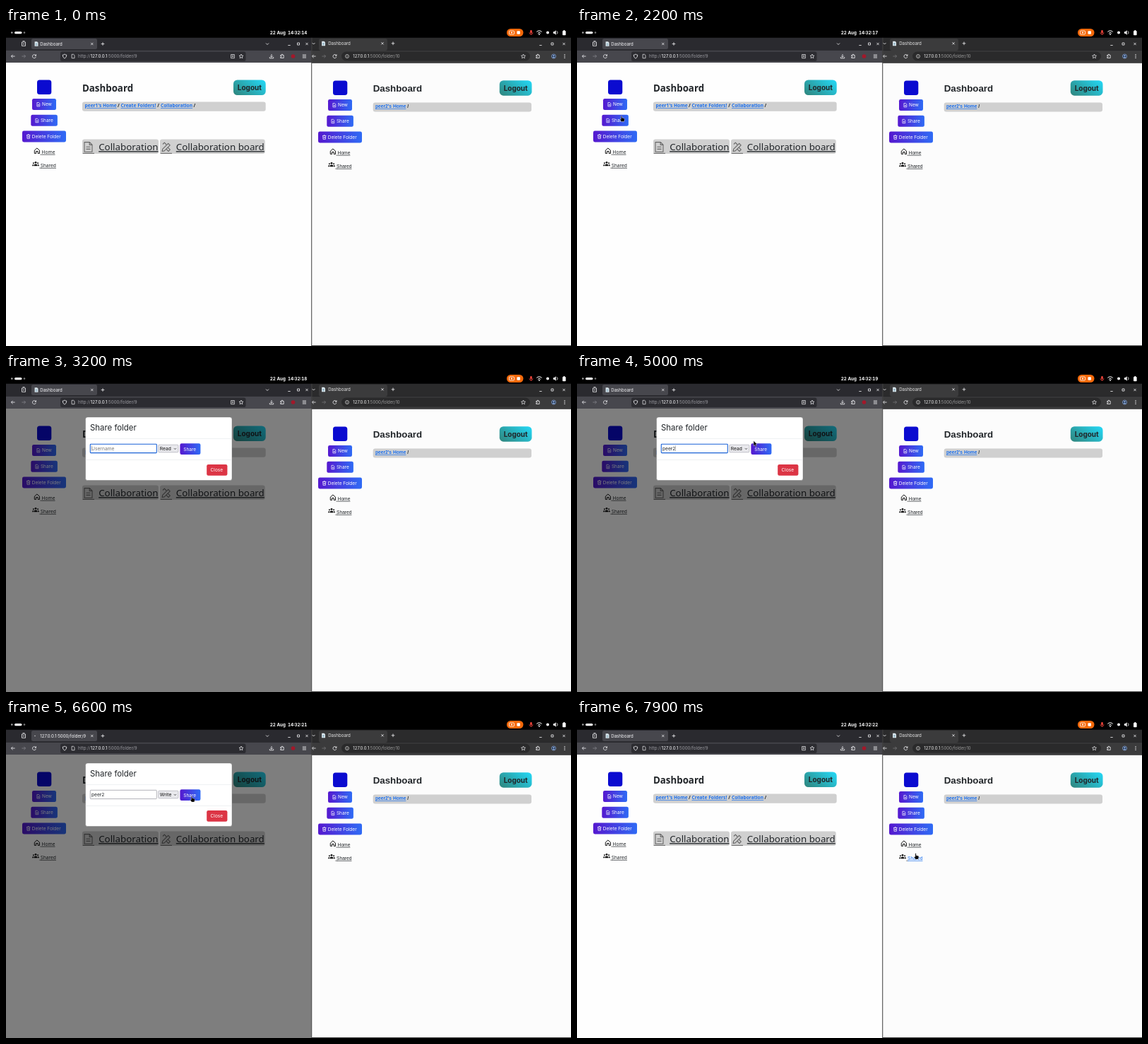
An HTML page for the animation above (8000 ms loop, 800 by 450 pixels).

```html
<!DOCTYPE html>
<html lang="en">
<head>
<meta charset="utf-8">
<title>Sharing a folder</title>
<style>
html, body { margin: 0; width: 800px; height: 450px; overflow: hidden; background: #000; }
svg { display: block; }
text { font-family: Inter, sans-serif; white-space: pre; }
.noto { font-family: "Noto Sans", sans-serif; }
.lib { font-family: "Liberation Sans", sans-serif; }
.b { font-weight: 700; }
.u { text-decoration: underline; }
.tab { font-variant-numeric: tabular-nums; }
</style>
</head>
<body>
<svg id="stage" width="800" height="450" viewBox="0 0 800 450"></svg>
<script>
const LOOP = 8000, STEP = 100;
const INK = '#212529', LINK = '#1a6fee', PALE = '#f4f4f6', DIM = '#9b9ba1';

const rect = (x, y, w, h, fill, r = 0, more = '') =>
  `<rect x="${x}" y="${y}" width="${w}" height="${h}" rx="${r}" fill="${fill}" ${more}/>`;
const dot = (x, y, r, fill, more = '') => `<circle cx="${x}" cy="${y}" r="${r}" fill="${fill}" ${more}/>`;
const text = (x, y, s, size, fill, cls = '', more = '') =>
  `<text x="${x}" y="${y}" font-size="${size}" fill="${fill}" class="${cls}" ${more}>${s}</text>`;
const line = (d, stroke = PALE, w = .8) =>
  `<path d="${d}" fill="none" stroke="${stroke}" stroke-width="${w}" stroke-linejoin="round"/>`;
const shape = (d, fill) => `<path d="${d}" fill="${fill}"/>`;
const group = (s, id = '', x = 0, y = 0) => `<g id="${id}" transform="translate(${x} ${y})">${s}</g>`;
const at = (x, y, s) => `<g transform="translate(${x} ${y})">${s}</g>`;

// Small icons, centred on their own origin
const cross = line('M-1.6-1.6L1.6 1.6M1.6-1.6L-1.6 1.6');
const plus = line('M-2.3 0H2.3M0-2.3V2.3');
const chevron = line('M-2-1L0 1 2-1');
const arrow = (dir, c) => line(`M${-2.6 * dir} 0H${2.6 * dir}M${.4 * dir}-2.2L${2.6 * dir} 0 ${.4 * dir} 2.2`, c);
const reload = line('M2.3-.9A2.5 2.5 0 1 0 2.4 .8M2.5-2.7V-.7H.6');
const star = line('M0-3L.9-1 3-.8 1.4 .6 1.9 2.7 0 1.6-1.9 2.7-1.4 .6-3-.8-.9-1Z', PALE, .7);
const puzzle = line('M-2.3-1.5H-.8A.9 .9 0 1 1 .8-1.5H2.2V2.4H-2.3V1.1A.9 .9 0 1 0-2.3-.3Z');
const page = shape('M-2.4-3.2H1L2.5-1.7V3.2H-2.4Z', '#dfeaf0') + line('M-1.2-.6H1.3M-1.2 .6H1.3M-1.2 1.8H1.3', '#568aa0', .6);
const sheet = c => line('M-1.9-2.7H.7L2-1.4V2.7H-1.9Z', c, .7);
const windowKeys = (a, b, c) => at(a, 24.5, line('M-1.7 0H1.7')) + at(b, 22.5, line('M-1.5-1.5H1.5V1.5H-1.5Z')) + at(c, 22.5, cross);

function topBar() {
  return rect(0, 0, 800, 13.5, '#000') +
    dot(8.3, 6.5, 1.3, '#a5a5a5') + rect(12, 5, 10.5, 3.2, '#fff', 1.6) + dot(26, 6.5, 1.3, '#777') +
    text(400, 8.9, '', 6.2, '#fff', 'b tab', 'id="clock" text-anchor="middle"') +
    rect(709, 1, 23.5, 11, '#f5690a', 5.5) + rect(712.5, 4, 7, 5, 'none', 1, 'stroke="#fff" stroke-width=".8"') +
    dot(716, 6.5, 1.1, '#fff') + rect(723.5, 4.3, 4.4, 4.4, '#fff', .8) +
    rect(742.2, 3, 2.6, 4.6, '#f0443a', 1.3) + line('M741 6.3A2.4 2.4 0 0 0 746 6.3M743.5 8.7V10', '#f0443a') +
    line('M751.3 5.5A5 5 0 0 1 758.7 5.5M753 7.4A2.8 2.8 0 0 1 757 7.4', '#fff', 1) + dot(755, 9, .9, '#fff') +
    dot(767, 6.5, 2, '#fff') +
    shape('M774.8 5.2H776.4L778.6 3.2V9.8L776.4 7.8H774.8Z', '#fff') + line('M780 4.4A3 3 0 0 1 780 8.6', '#fff') +
    rect(788, 4, 4.6, 6.3, '#fff', .8) + rect(789.4, 3, 1.8, 1.2, '#fff');
}

function leftChrome() {
  return rect(0, 13.5, 432.5, 18, '#2a2a2f') + rect(0, 31.5, 432.5, 17.5, '#47474d') +
    line('M22.5 20H27.5V25.3H22.5ZM23.5 18.6H26.5M24 22L25 23.2 26 22') +
    rect(36, 15, 93, 15, '#47474d', 2.5) + rect(36, 15, 60, 15, 'url(#burst)', 2.5, 'id="burst-tab"') +
    group(at(43, 22.5, page), 'favicon') + group(dot(41, 22.5, .8, '#ccc'), 'spinner') +
    text(48.3, 24.7, '', 6.1, '#fbfbfe', '', 'id="tab-title"') +
    at(121.8, 22.5, cross) + at(137, 22.5, plus) + at(370, 22.5, chevron) + windowKeys(401, 414, 426) +
    at(10, 40, arrow(-1, PALE)) + at(25, 40, arrow(1, '#85858b')) + at(40, 40, reload) +
    rect(77, 33.5, 262.5, 13.5, '#2c2c31', 2.5) +
    line('M83 37Q84.5 38.2 85.8 38.1 85.9 41.6 83 43.2 80.1 41.6 80.2 38.1 81.5 38.2 83 37Z') + at(95, 40, sheet(PALE)) +
    text(102, 42.3, `http://<tspan fill="#fbfbfe">127.0.0.1</tspan>:5000/folder/9`, 6.2, DIM) +
    group(line('M318.6 37.5H323.4V42.7H318.6ZM319.8 39.2H322.2M319.8 40.7H322.2', PALE, .7), 'reader') + at(333, 40, star) +
    line('M376 37V41.3M374.2 39.6L376 41.4 377.8 39.6M373.3 41V42.8H378.7V41') + at(391, 40, puzzle) +
    dot(406.5, 40, 2.8, '#a3182a') + line('M419.8 38H425M419.8 40H425M419.8 42H425');
}

function rightChrome() {
  return rect(433, 13.5, 367, 18, '#2b2b2c') + rect(433, 31.5, 367, 18, '#3b3b3c') +
    rect(443, 15, 97, 17, '#3b3b3c', 3) + at(435.5, 22, chevron) + at(449.5, 22, page) +
    text(456.2, 24, 'Dashboard', 6.15, '#e6e6e6') + at(533, 21.8, cross) + at(548, 21.8, plus) + windowKeys(757, 773.5, 790) +
    at(436, 40, arrow(-1, PALE)) + at(450, 40, arrow(1, '#77777a')) + at(465.5, 40, reload) +
    rect(475, 33.5, 267, 13, '#2a2a2b', 6.5) +
    dot(483, 40, 2.5, 'none', 'stroke="#ddd" stroke-width=".7"') + line('M483 39.6V41.4M483 38.3V38.8', '#ddd', .7) +
    text(491.3, 42, '127.0.0.1<tspan fill="#9b9b9b">:5000/folder/10</tspan>', 6, '#f0f0f0') +
    at(732.5, 40, star) + at(753, 40, puzzle) +
    dot(775.5, 40, 3, '#273a57', 'stroke="#a8c7fa" stroke-width=".6"') + dot(775.5, 39.2, 1, '#a8c7fa') +
    shape('M773.7 42.2Q775.5 39.8 777.3 42.2Z', '#a8c7fa') +
    [37.7, 40, 42.3].map(y => dot(791, y, .7, PALE)).join('');
}

const button = (x, y, w, h, label, tx, fill = 'url(#violet)') =>
  rect(x, y, w, h, fill, 2.3) + text(tx, y + h / 2 + 2.4, label, 6.5, '#fff');

function sidebar(font, sharedId) {
  const filePlus = sheet('#fff') + line('M-1 .6H1.1M0-.5V1.6', '#fff', .6);
  const people = [[42, 190.3, 1.4], [38.9, 191.2, 1], [45.1, 191.2, 1]].map(p => dot(...p, '#111')).join('') +
    shape('M39.4 195.2Q39.5 192.6 42 192.6T44.6 195.2Z', '#111') +
    shape('M37 195.2Q37 193 39.2 193L38.7 195.2ZM47 195.2Q47 193 44.8 193L45.3 195.2Z', '#111');
  return rect(44, 73.5, 20.3, 20.5, '#0b0bd0', 3.5) +
    button(37, 100, 34, 16, 'New', 51) + at(45.8, 108.2, filePlus) +
    button(35.3, 122.8, 37.6, 16, 'Share', 48.9) + at(43.8, 131, filePlus) +
    button(23, 145.6, 62, 15.8, 'Delete Folder', 36.8) +
    line('M29 151.5H34.4M30.8 150.6H32.6M29.7 151.6L30 156.4H33.4L33.7 151.6M31.1 153V155M32.3 153V155', '#fff', .7) +
    line('M40.3 173.2L43.9 170 47.5 173.2V177.4H45.2V174.5H42.6V177.4H40.3Z', '#111', 1) + line('M48 179.2H51', '#222', .5) +
    text(50.6, 177.8, 'Home', 6.67, INK, font + ' u') +
    people + line('M47 198.2H50', '#222', .5) + text(49, 196.9, 'Shared', 6.67, INK, font + ' u', `id="${sharedId}"`);
}

const heading = (x, y, font, logoutX) =>
  text(x, y, 'Dashboard', 13.3, INK, font + ' b') +
  rect(logoutX, y - 16, 45.7, 21.5, 'url(#teal)', 5.5) +
  text(logoutX + 22.9, y - 1.5, 'Logout', 10, INK, 'b', 'text-anchor="middle"');

const crumb = (x, y, s, font, slash) =>
  text(x, y, s, 6.67, LINK, font + ' b u') + text(slash, y, '/', 6.67, INK, font + ' b');

function leftPage() {
  return rect(0, 49, 432.5, 401, '#fefefe') + group(sidebar('noto', 'shared-left')) + heading(108, 89.5, 'noto', 322) +
    rect(108, 104.6, 259.7, 13.2, '#d0d0d0', 3) +
    crumb(111.5, 112.2, "peer1's Home", 'noto', 158) + crumb(162.5, 112.2, 'Create Folders!', 'noto', 214.3) +
    crumb(219, 112.2, 'Collaboration', 'noto', 265.5) +
    rect(108, 157.5, 108, 20.5, '#d0d0d0', 3) + rect(218, 157.5, 148.7, 20.5, '#d0d0d0', 3) +
    line('M111 161.6H118.4L122 165.2V175.2H111ZM118.2 161.8V165.4H121.8M113.5 168.3H119.5M113.5 171.4H119.5', '#666', 1.1) +
    line('M221 174.5L221.7 171.4 229.7 163.3 232.2 165.8 224.2 173.9ZM222 164.5L224.3 162.2 227 165M229.5 169.4L232.3 172.2 230 174.5 227.2 171.7', '#666', 1.1) +
    line('M108.5 177.4H125M218.5 177.4H235', '#333', .7) +
    text(131.2, 173.2, 'Collaboration', 13.33, INK, 'noto u') + text(240.8, 173.2, 'Collaboration board', 13.33, INK, 'noto u');
}

const rightPage = () =>
  rect(433, 49.5, 367, 400.5, '#fcfcfc') + group(sidebar('lib', 'shared-right'), '', 419, 1) + heading(519.7, 90.2, 'lib', 698.8) +
  rect(519.7, 105.4, 224.3, 13.2, '#d0d0d0', 3) + crumb(523, 113, "peer2's Home", 'lib', 568.2) +
  line('M433 449.5H800', '#444', 1);

function modal() {
  return rect(0, 49, 432.5, 401, '#000', 0, 'opacity=".5"') +
    rect(112.5, 61, 207.5, 89.6, '#fff', 3.2, 'stroke="#666" stroke-width=".4"') +
    text(119, 80.2, 'Share folder', 11.4, INK) + line('M112.7 91.5H319.8M112.7 121.5H319.8', '#dee2e6', .5) +
    rect(119.3, 99.3, 94, 12.3, '#fff', .8, 'id="field"') + text(121, 107.8, '', 6.67, INK, '', 'id="entry"') +
    rect(215.6, 100.2, 28.4, 10.6, '#e9e9ed', 1.4, 'stroke="#8f8f9d" stroke-width=".5"') +
    text(217.8, 107.8, '', 6.67, '#111', '', 'id="choice"') + line('M237.8 105L239.4 106.6 241 105', '#222', .7) +
    button(246.4, 98.3, 29, 15.8, 'Share', 251.3) + button(284.2, 128, 29.2, 15.8, 'Close', 289.6, '#dc3545') +
    group(rect(215.6, 111.4, 31, 26, '#fff', 1, 'stroke="#8f8f9d" stroke-width=".5"') +
      rect(216, 0, 30.2, 12, '#d7d7de', .5, 'id="option"') +
      text(218, 120.5, 'Read', 6.67, '#111') + text(218, 133, 'Write', 6.67, '#111'), 'menu');
}

const gradient = (id, a, b, more = '') =>
  `<linearGradient id="${id}" ${more}><stop stop-color="${a}"/><stop offset="1" stop-color="${b}"/></linearGradient>`;
const cursorShape = (id, d) => `<path id="${id}" d="${d}" fill="#000" stroke="#fff" stroke-width=".4"/>`;

document.getElementById('stage').innerHTML =
  `<defs>${gradient('violet', '#5518cf', '#2f6bf5')}${gradient('teal', '#2e8a84', '#24d3ef', 'x1="0" y1=".8" x2="1" y2=".2"')}` +
  `${gradient('burst', '#2b67a8', '#47474d')}</defs>` +
  rightPage() + rightChrome() + leftPage() + group(modal(), 'modal') + leftChrome() +
  line('M432.8 13.5V450', '#555', .8) + topBar() +
  group(cursorShape('pointer', 'M0 0V7.2L1.7 5.7 3 8.4 4.2 7.8 3 5.1H5.2Z') +
    cursorShape('hand', 'M-.7 .7Q0-.6 .7 .7V3L3.6 3.8Q4.6 4.2 4.4 5.4L3.7 8.6H-.2L-2.2 5.6Q-2.2 4.5-.7 5.2Z'), 'cursor');

const el = Object.fromEntries([...document.querySelectorAll('#stage [id]')].map(n => [n.id, n]));
const show = (id, on) => el[id].setAttribute('display', on ? 'inline' : 'none');
const set = (id, values) => { for (const k in values) el[id].setAttribute(k, values[k]); };

// time, x, y of the cursor tip
const path = [
  [1100, 586, 399], [1900, 63, 124], [2300, 63, 124], [2800, 150, 122], [2900, 150, 104], [3200, 150, 104],
  [4800, 222, 104], [5000, 250, 94.5], [5200, 231, 105], [5500, 231, 105], [5800, 230, 132], [6000, 230, 132],
  [6400, 263, 107.5], [6700, 263, 107.5], [7400, 565, 176], [7600, 490, 201], [7700, 460, 203], [7900, 479.5, 188.5]
];
function tip(t) {
  const i = path.findIndex(p => p[0] >= t);
  if (i < 1) return path[i < 0 ? path.length - 1 : 0].slice(1);
  const [a, b] = [path[i - 1], path[i]];
  const k = (t - a[0]) / (b[0] - a[0]), e = k * k * (3 - 2 * k);
  return [1, 2].map(j => a[j] + (b[j] - a[j]) * e);
}

function draw(now) {
  const t = Math.floor(now % LOOP / STEP) * STEP;
  const within = (a, b) => t >= a && t < b;
  el.clock.textContent = `22 Aug\u2002 14:32:${14 + Math.floor((t + 900) / 1000)}`.replace('\u2002 ', '\u2002');

  const loading = within(6600, 6700);
  el['tab-title'].textContent = loading ? '127.0.0.1:5000/folder/9' : 'Dashboard';
  show('favicon', !loading);
  show('reader', !loading);
  show('spinner', loading);
  show('burst-tab', within(6700, 7000));

  show('modal', within(2300, 6700));
  const focus = within(2900, 5500);
  set('field', { stroke: focus ? '#1a62d6' : '#80808a', 'stroke-width': focus ? 1.1 : .6 });
  const typed = 'peer2'.slice(0, [3900, 4000, 4100, 4200, 4500].filter(k => t >= k).length);
  el.entry.textContent = typed || (focus ? '|Username' : 'Username');
  if (focus) el.entry.innerHTML = `${typed}<tspan font-size="7" font-weight="200" dx="-.8">|</tspan>` +
    (typed ? '' : '<tspan x="121" fill="#757575">Username</tspan>');
  set('entry', { fill: typed || focus ? INK : '#757575' });
  el.choice.textContent = t < 6000 ? 'Read' : 'Write';
  show('menu', within(5500, 6000));
  set('option', { y: t < 5700 ? 112 : 124.6 });

  const [x, y] = tip(t), hand = within(1900, 2300) || within(6300, 6800) || t >= 7800;
  show('cursor', within(1100, 3200) || t >= 4800);
  set('cursor', { transform: `translate(${x} ${y})` });
  show('hand', hand);
  show('pointer', !hand);
  set('shared-right', { fill: t >= 7800 ? LINK : INK });
}

const start = performance.now();
function tick() {
  draw(performance.now() - start);
  requestAnimationFrame(tick);
}
tick();
</script>
</body>
</html>
```
